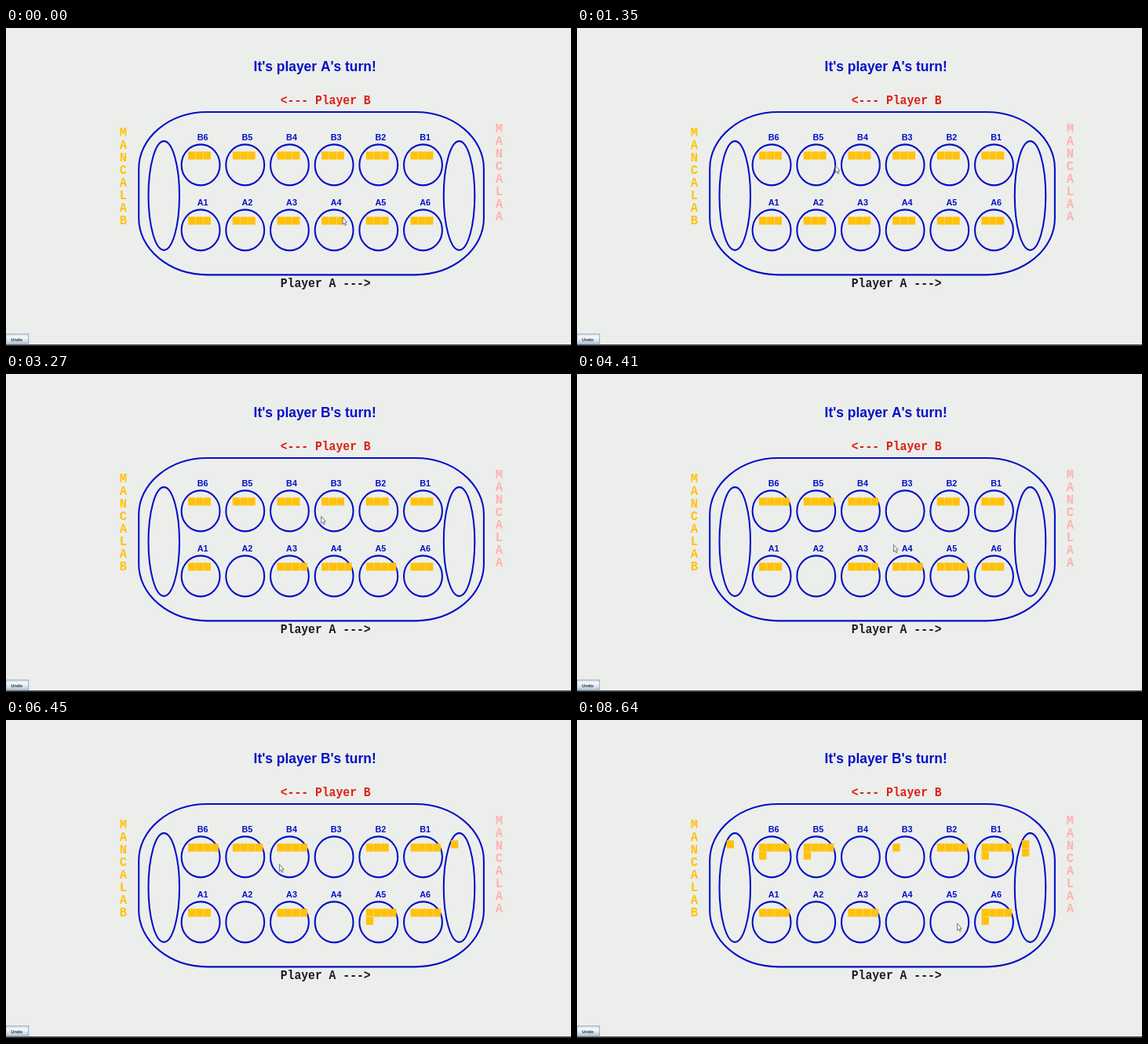
Recreate the animation shown at these times as an HTML page with a canvas. Size 720 px wide and 405 px high, loop 8.67 s.

```html
<!DOCTYPE html>
<html lang="en">
<head>
<meta charset="utf-8">
<title>Mancala</title>
<style>
  html, body { margin: 0; width: 100%; height: 100%; overflow: hidden; background: #eceeeb; }
  canvas { display: block; }
</style>
</head>
<body>
<canvas id="stage" width="720" height="405"></canvas>
<script>
const ctx = document.getElementById('stage').getContext('2d');
const LOOP = 8670;
const REST = 240; // pause of the pointer after each click
const SQUEEZE = 0.94; // the whole scene is slightly narrowed
const WIDTH = 720 / SQUEEZE;
const BLUE = '#0410c8', GOLD = '#ffc20a';
const SANS = '"Liberation Sans", Arial, sans-serif';
const MONO = '"Liberation Mono", "Courier New", monospace';

// Pits 0-5 are A1-A6, 6 is Mancala A, 7-12 are B1-B6, 13 is Mancala B.
const STORE_A = 6, STORE_B = 13;
const START = { x: 456.4, y: 241 };
// Each move: when and which pit is clicked, and how far the pointer's way there bows.
const MOVES = [
  { at: 2010, pit: 1, bow: { x: -20, y: -105 } },
  { at: 3660, pit: 9, bow: { x: -9, y: -17 } },
  { at: 5070, pit: 3, bow: { x: -27, y: 8 } },
  { at: 6870, pit: 10, bow: { x: -60, y: -12 } },
  { at: 8310, pit: 4, bow: { x: -19, y: -12 } }
];
const ARROW = new Path2D('M0 0V9L2 7.3 3.4 10.4 4.9 9.7 3.5 6.7 6 6.5Z');

const isStore = pit => pit === STORE_A || pit === STORE_B;

function centre(pit) {
  const top = pit > STORE_A, column = top ? 12 - pit : pit;
  return { x: 263.9 + column * 60.3, y: top ? 174.4 : 257.4 };
}

function boardAt(time) {
  const pits = Array.from({ length: 14 }, (_, i) => isStore(i) ? 0 : 3);
  const played = MOVES.filter(move => time >= move.at);
  for (const { pit } of played) {
    const hand = pits[pit];
    pits[pit] = 0;
    for (let n = 1; n <= hand; n++) pits[(pit + n) % 14]++;
  }
  return { pits, player: 'AB'[played.length % 2] };
}

function pointerAt(time) {
  let from = START, leave = 0;
  for (const { at, pit, bow } of MOVES) {
    const { x, y } = centre(pit), to = { x: x + 10.5, y: y + 1.6 };
    if (time < at) {
      const u = Math.max(0, (time - leave) / (at - leave)), s = u * u * (3 - 2 * u);
      const along = axis => from[axis] + (to[axis] - from[axis]) * s + bow[axis] * 4 * s * (1 - s);
      return { x: along('x'), y: along('y') };
    }
    from = to;
    leave = at + REST;
  }
  return from;
}

function text(string, x, y, size, color, family, align = 'left') {
  ctx.font = `bold ${size}px ${family}`;
  ctx.textAlign = align;
  ctx.fillStyle = color;
  ctx.fillText(string, x, y);
}

function oval(x, y, rx, ry) {
  ctx.beginPath();
  ctx.ellipse(x, y, rx, ry, 0, 0, 2 * Math.PI);
  ctx.stroke();
}

function stones(count, x, y, perRow) {
  ctx.fillStyle = GOLD;
  for (let n = 0; n < count; n++) {
    ctx.fillRect(x + n % perRow * 10.35, y + Math.floor(n / perRow) * 10.4, 10, 10.1);
  }
}

function drawPit(pit, count) {
  const { x, y } = centre(pit);
  const label = pit < STORE_A ? 'A' + (pit + 1) : 'B' + (pit - STORE_A);
  oval(x, y, 26, 26);
  text(label, x - 4.6, y - 31.6, 11.5, BLUE, SANS);
  stones(count, x - 17, y - 17, 4);
}

function drawStore(name, x, count, labelX, labelY, color) {
  oval(x, 213.5, 21, 69.3);
  stones(count, x - 11.3, 153.3, 1);
  [...'MANCALA', name].forEach((letter, i) =>
    text(letter, labelX, labelY + i * 15.9, 16.5, color, MONO, 'center'));
}

function undoButton() {
  const fill = ctx.createLinearGradient(0, 390, 0, 402);
  fill.addColorStop(0, '#dde8f3');
  fill.addColorStop(0.35, '#f4f8fb');
  fill.addColorStop(1, '#b8cfe5');
  ctx.fillStyle = fill;
  ctx.fillRect(0, 389.5, 31, 12.5);
  ctx.lineWidth = 0.8;
  ctx.strokeStyle = '#8492a0';
  ctx.strokeRect(0, 389.9, 30.6, 12);
  text('Undo', 14.5, 398.5, 6.2, '#33363a', SANS, 'center');
}

function drawPointer({ x, y }) {
  ctx.translate(x, y);
  ctx.fillStyle = '#f6f6f6';
  ctx.fill(ARROW);
  ctx.lineWidth = 0.9;
  ctx.strokeStyle = '#66686c';
  ctx.stroke(ARROW);
}

function draw(time) {
  const { pits, player } = boardAt(time);
  ctx.setTransform(SQUEEZE, 0, 0, 1, 0, 0);
  ctx.fillStyle = '#eceeeb';
  ctx.fillRect(0, 0, WIDTH, 405);
  ctx.fillStyle = '#3a3d42';
  ctx.fillRect(0, 403, WIDTH, 2);

  text(`It's player ${player}'s turn!`, 335.7, 55, 18.5, BLUE, SANS);
  text('<--- Player B', 372, 97, 15.7, '#dc2018', MONO);
  text('Player A --->', 372, 330, 15.7, '#1c1c1e', MONO);

  ctx.lineWidth = 2.2;
  ctx.strokeStyle = BLUE;
  ctx.beginPath();
  ctx.roundRect(180, 107, 467.8, 207.3, { x: 93, y: 72 });
  ctx.stroke();
  drawStore('B', 214.1, pits[STORE_B], 158.9, 138.4, GOLD);
  drawStore('A', 614.4, pits[STORE_A], 668.4, 133.2, '#ffb2ae');
  pits.forEach((count, pit) => isStore(pit) || drawPit(pit, count));

  undoButton();
  drawPointer(pointerAt(time));
}

function tick() {
  draw(performance.now() % LOOP);
  requestAnimationFrame(tick);
}
tick();
</script>
</body>
</html>
```
